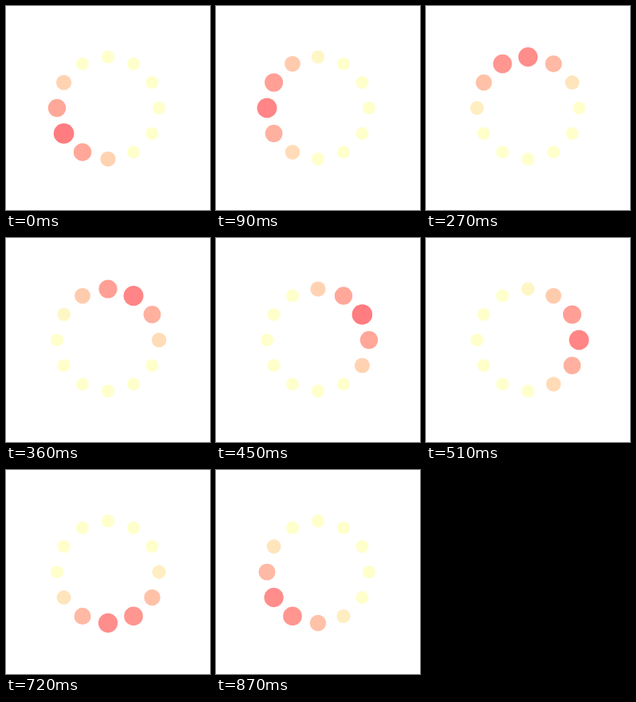
Write an HTML page that moves like this. It is 256 by 256 pixels and loops after 900 ms.

```html
<!DOCTYPE html>
<html>
<head>
<meta charset="utf-8">
<title>Dot spinner</title>
<style>
  html, body { margin: 0; width: 100%; height: 100%; overflow: hidden; background: #fff; }
  svg { display: block; width: 100vw; height: 100vh; }
</style>
</head>
<body>
<svg viewBox="0 0 256 256"></svg>
<script>
const LOOP = 900, STEP = 30, COUNT = 12, RING = 64;
const HOT = [255, 124, 129], COOL = [255, 255, 203];
const svg = document.querySelector('svg');

const dots = Array.from({ length: COUNT }, (_, i) => {
  const angle = i * 360 / COUNT, rad = angle * Math.PI / 180;
  const node = document.createElementNS('http://www.w3.org/2000/svg', 'circle');
  node.setAttribute('cx', 128 + RING * Math.cos(rad));
  node.setAttribute('cy', 128 + RING * Math.sin(rad));
  svg.append(node);
  return { angle, node };
});

function draw(now) {
  const time = Math.floor((now % LOOP) / STEP) * STEP;
  const peak = 150 + 360 * time / LOOP;
  for (const { angle, node } of dots) {
    // Heat falls linearly to zero a quarter turn either side of the peak
    const turn = (angle - peak + 1080) % 360;
    const heat = Math.max(0, 1 - Math.min(turn, 360 - turn) / 90);
    const color = COOL.map((c, i) => Math.round(c + (HOT[i] - c) * heat));
    node.setAttribute('r', 8 * (1 + 0.6 * heat));
    node.setAttribute('fill', `rgb(${color})`);
  }
}

function tick() {
  draw(performance.now());
  requestAnimationFrame(tick);
}
tick();
</script>
</body>
</html>
```
